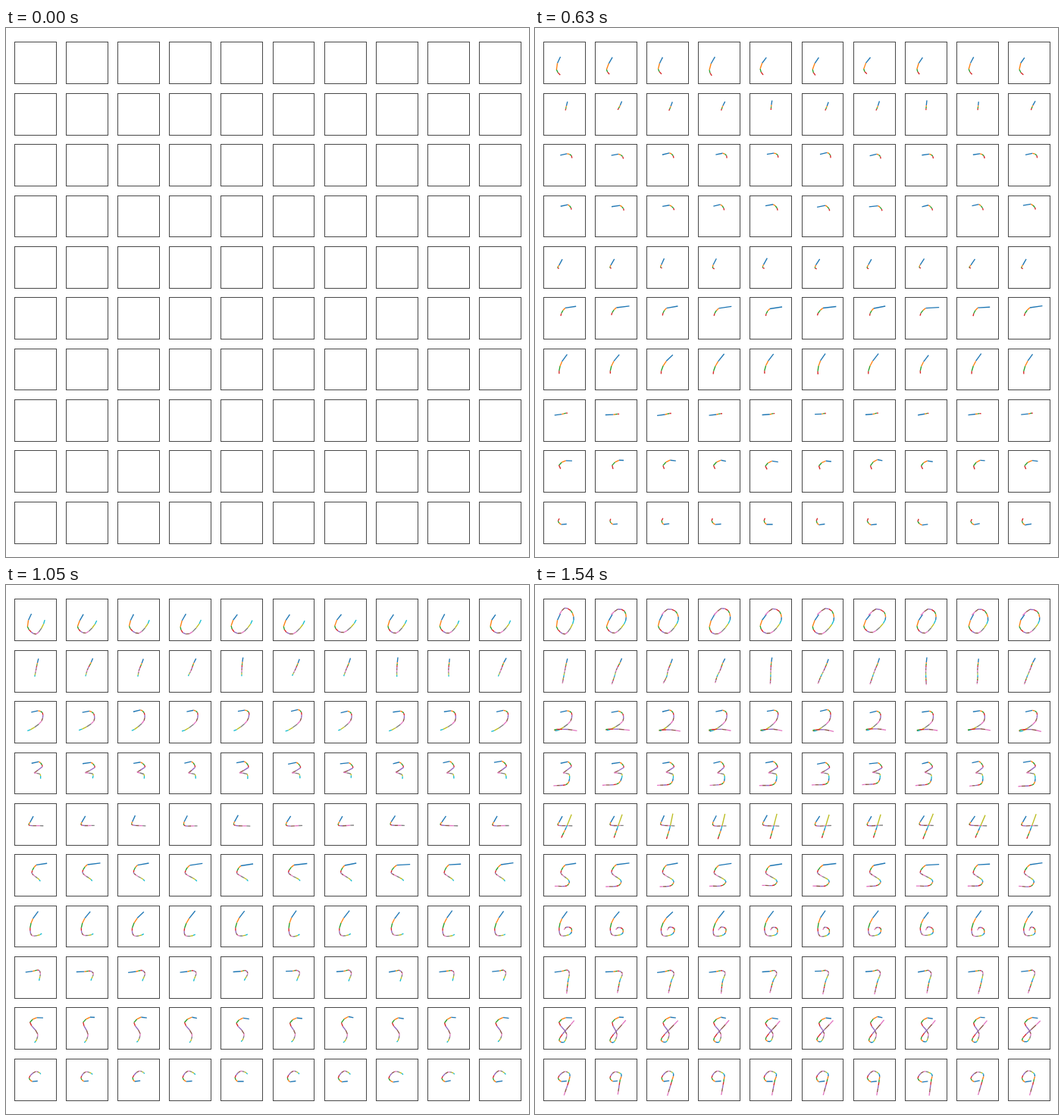
Recreate the animation shown at these times as an HTML page with a canvas. Size 690 px wide and 698 px high, loop 1890 ms.

```html
<!DOCTYPE html>
<html lang="en">
<head>
<meta charset="utf-8">
<title>Handwritten digits</title>
<style>
html, body { margin: 0; width: 100%; height: 100%; overflow: hidden; background: #fff; }
canvas { display: block; }
</style>
</head>
<body>
<canvas id="stage" width="690" height="698"></canvas>
<script>
const ctx = document.getElementById('stage').getContext('2d');
const COLORS = ['#1f77b4', '#ff7f0e', '#2ca02c', '#d62728', '#9467bd',
                '#8c564b', '#e377c2', '#7f7f7f', '#bcbd22', '#17becf'];
const LOOP = 1890, HOLD = 350, STEP = 70, STEPS = 18;
const MID = 28;

const cellX = c => 11 + 68.1 * c;
const cellY = r => 18.4 + 67.38 * r;

function seeded(seed) {
  return () => {
    seed = seed + 0x6d2b79f5 | 0;
    let t = Math.imul(seed ^ seed >>> 15, 1 | seed);
    t = t + Math.imul(t ^ t >>> 7, 61 | t) ^ t;
    return ((t ^ t >>> 14) >>> 0) / 4294967296;
  };
}
const random = seeded(7);
const spread = amount => (random() * 2 - 1) * amount;

const gap = (a, b) => Math.sqrt(Math.hypot(b[0] - a[0], b[1] - a[1])) || 0.01;
const mirror = (a, b) => [2 * a[0] - b[0], 2 * a[1] - b[1]];

// Centripetal Catmull-Rom between b and c
function curve(a, b, c, d, u) {
  const g1 = gap(a, b), g2 = gap(b, c), g3 = gap(c, d), v = 1 - u;
  return [0, 1].map(k => {
    const s = (c[k] - b[k]) / g2;
    const m = g2 * ((b[k] - a[k]) / g1 - (c[k] - a[k]) / (g1 + g2) + s);
    const n = g2 * (s - (d[k] - b[k]) / (g2 + g3) + (d[k] - c[k]) / g3);
    return b[k] * v * v * (1 + 2 * u) + m * u * v * v +
           c[k] * u * u * (3 - 2 * u) - n * u * u * v;
  });
}

const segments = [];

// Each hand writes with its own lean and proportions
function writer(left, top, lean) {
  const slant = spread(lean), wide = 1 + spread(0.12), tall = 1 + spread(0.06);
  return ([, x, y]) => {
    const dx = (x - MID) * wide, dy = (y - MID) * tall;
    return [left + MID + dx - dy * slant + spread(0.6) + 0.5,
            top + MID + dy + spread(0.6) + 0.5];
  };
}

function addGlyph(strokes, place) {
  let drawn = 0;
  for (const stroke of strokes) {
    const pts = stroke.map(place);
    for (let j = 0; j + 1 < pts.length; j++) {
      const b = pts[j], c = pts[j + 1];
      const a = pts[j - 1] || mirror(b, c);
      const d = pts[j + 2] || mirror(c, b);
      const first = stroke[j][0], n = stroke[j + 1][0] - first;
      const at = i => n === 1 ? (i ? c : b) : curve(a, b, c, d, i / n);
      for (let i = 0; i < n; i++) {
        segments.push({
          from: at(i), to: at(i + 1),
          show: first + i + 2,
          color: COLORS[drawn++ % 10]
        });
      }
    }
  }
}

function addRow(row, lean, ...strokes) {
  for (let col = 0; col < 10; col++) {
    addGlyph(strokes, writer(Math.round(cellX(col)), Math.round(cellY(row)), lean));
  }
}

// Key points of each digit: [pen step, x, y]
addRow(0, 0.1, [[0, 22, 20], [1, 17, 28], [2, 15, 36], [4, 19, 43], [6, 27, 45],
                [10, 41, 28], [13, 38, 16], [15, 29, 13], [17, 20, 21]]);
addRow(1, 0.25, [[0, 33, 10], [1, 31, 16], [6, 28, 26], [10, 26, 34], [17, 23, 44]]);
addRow(2, 0.1, [[0, 22, 14], [1, 31, 12], [3, 36, 15], [6, 35, 26], [10, 17, 39],
                [12, 15, 38], [15, 31, 37], [17, 43, 39]]);
addRow(3, 0.1, [[0, 21, 14], [1, 31, 12], [4, 36, 19], [6, 25, 26], [8, 34, 28],
                [12, 32, 40], [17, 13, 43]]);
addRow(4, 0.1, [[0, 24, 16], [1, 19, 24], [3, 18, 28], [8, 38, 29]],
               [[11, 36, 14], [12, 31, 29], [17, 25, 46]]);
addRow(5, 0.1, [[0, 43, 12], [1, 27, 14], [4, 21, 24], [6, 24, 27], [10, 35, 35],
                [13, 32, 41], [17, 15, 42]]);
addRow(6, 0.1, [[0, 32, 7], [1, 25, 16], [3, 20, 29], [6, 22, 39], [10, 35, 37],
                [13, 36, 30], [15, 30, 28], [17, 27, 32]]);
addRow(7, 0.1, [[0, 15, 20], [1, 25, 19], [4, 32, 18], [6, 35, 21], [10, 32, 32],
                [17, 28, 49]]);
addRow(8, 0.1, [[0, 37, 14], [1, 30, 13], [3, 21, 20], [6, 30, 35], [10, 26, 46],
                [12, 20, 43], [17, 40, 17]]);
addRow(9, 0.1, [[0, 30, 29], [1, 22, 30], [3, 18, 25], [6, 26, 16], [10, 35, 20],
                [12, 34, 27], [17, 29, 48]]);

function drawGrid() {
  ctx.strokeStyle = '#484848';
  ctx.lineWidth = 1;
  for (let r = 0; r < 10; r++) {
    for (let c = 0; c < 10; c++) {
      const x = Math.round(cellX(c)), y = Math.round(cellY(r));
      const right = Math.floor(cellX(c) + 55.45), bottom = Math.floor(cellY(r) + 55.3);
      ctx.strokeRect(x + 0.5, y + 0.5, right - x, bottom - y);
    }
  }
}

function draw(step) {
  ctx.fillStyle = '#fff';
  ctx.fillRect(0, 0, 690, 698);
  drawGrid();
  ctx.lineWidth = 1.35;
  for (const s of segments) {
    if (s.show > step) continue;
    ctx.strokeStyle = s.color;
    ctx.beginPath();
    ctx.moveTo(...s.from);
    ctx.lineTo(...s.to);
    ctx.stroke();
  }
}

const start = performance.now();
let shown = -1;

function tick() {
  const t = (performance.now() - start) % LOOP;
  const step = t < HOLD ? 0 : Math.min(STEPS, Math.floor((t - HOLD) / STEP) + 1);
  if (step !== shown) draw(shown = step);
  requestAnimationFrame(tick);
}
tick();
</script>
</body>
</html>
```
